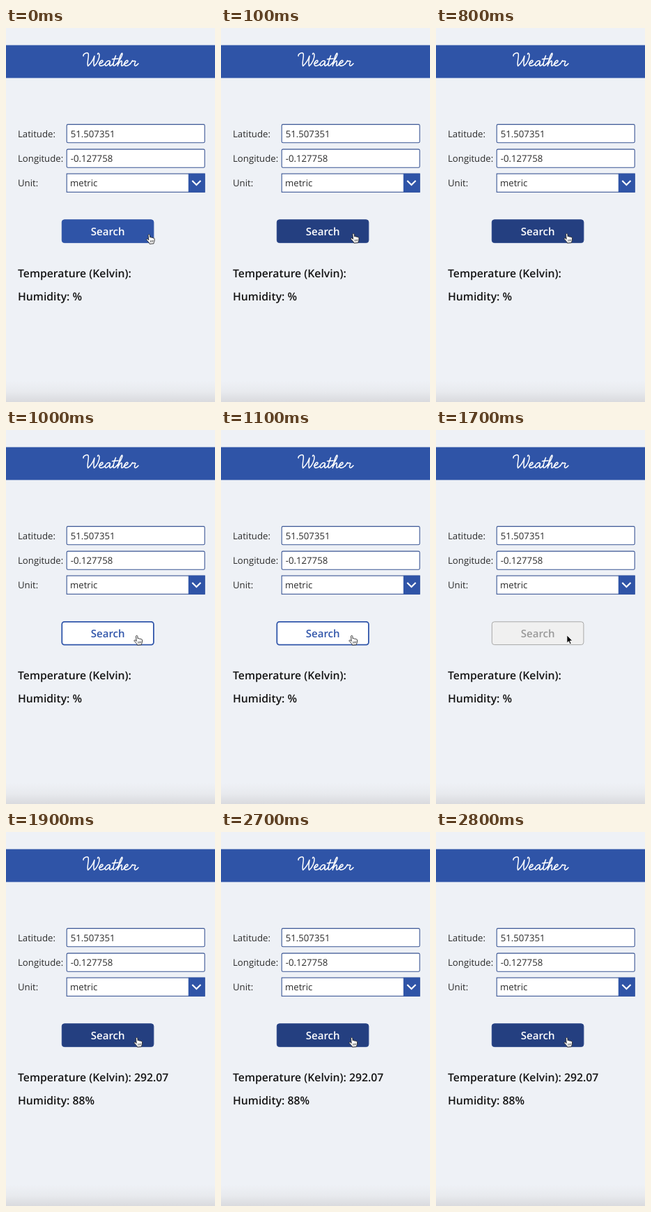
An HTML page that plays this animation: 300 by 534 pixels, repeating every 3.2 s.

```html
<!DOCTYPE html>
<html lang="en">
<head>
<meta charset="utf-8">
<title>Weather</title>
<style>
  html, body { margin: 0; width: 100%; height: 100%; overflow: hidden; background: #eef1f6; }
  svg { display: block; width: 100%; height: 100%; }
  text { font: 13.2px "Open Sans", sans-serif; fill: #2b2b2b; white-space: pre; text-rendering: geometricPrecision; }
  .strong { font-size: 15.75px; font-weight: 600; fill: #151515; }
  .field { fill: #fff; stroke: #3a5594; stroke-width: 1.1; }
  #label { font-size: 15.05px; font-weight: 600; text-anchor: middle; }
  .script { fill: none; stroke: #fff; stroke-width: 1.5; stroke-linecap: round; stroke-linejoin: round; }
  .outline { stroke-width: .9; stroke-linejoin: round; }
</style>
</head>
<body>
<svg viewBox="0 0 300 534">
  <defs>
    <linearGradient id="shade" x2="0" y2="1">
      <stop stop-color="#eef1f6"/>
      <stop offset=".5" stop-color="#e8eaee"/>
      <stop offset="1" stop-color="#d9dade"/>
    </linearGradient>
    <path id="e" d="M133.5 51C137 50.5 139.7 48.5 139 46.8C138 45 134 48 134 51.5C134 55.5 139 54.5 142.5 51"/>
  </defs>

  <rect width="300" height="534" fill="#eef1f6"/>
  <rect y="504" width="300" height="30" fill="url(#shade)"/>
  <rect y="24.5" width="300" height="46.9" fill="#2f54a7"/>

  <g class="script" role="img" aria-label="Weather">
    <path d="M111 40C110.5 37 116.5 34 118.1 36.6C119.5 40 115.8 50 117.6 54.3C121 52 125.5 45 127 40C126.3 45 125 51 126.5 54.3C131 51 134.5 43 134 38C133.6 35.4 131.3 35.6 131.6 37.6"/>
    <use href="#e"/>
    <path d="M149.5 47.5C146.5 45.2 142.2 49.5 142.2 52.5C142.3 55.5 147 53.5 149.5 48C148.5 52 148.3 54.3 150 54C151.5 53.5 153 52 154 50.5"/>
    <path d="M157.5 39.5C155.5 45 153.5 50 154 53C154.5 55 157 53.5 159 51M152.5 44.5L161 43.8"/>
    <path d="M159 51C163 47 167.5 39 167 36.5C166 34 162.5 42 160.2 54.3C161.5 50 164.5 46.5 166 47C167.5 48 164.5 53 166 54C167.5 54.3 169 52.5 170 51"/>
    <use href="#e" x="36"/>
    <path d="M178 51.5C180 49.5 181.5 46 181.8 46.5C181 48.5 185.5 46.5 186 47.5C184.5 50.5 183.5 54 186 54C187.5 53.8 189 52 190 50.8"/>
  </g>

  <text x="17" y="155.5">Latitude:</text>
  <text x="17" y="191">Longitude:</text>
  <text x="17" y="226">Unit:</text>
  <rect class="field" x="87.2" y="137.6" width="198" height="26.2" rx="1.8"/>
  <rect class="field" x="87.2" y="173.1" width="198" height="26.2" rx="1.8"/>
  <rect class="field" x="87.2" y="208.1" width="198" height="26.2"/>
  <rect x="261.8" y="207.8" width="23.8" height="26.8" fill="#2f54a7"/>
  <path d="M267.3 218L273.4 224L279.5 218" fill="none" stroke="#fff" stroke-width="2.1"/>
  <text x="92.7" y="156">51.507351</text>
  <text x="92.7" y="191.3">-0.127758</text>
  <text x="92" y="226">metric</text>

  <rect id="button" x="80.3" y="273.8" width="131.6" height="32.8" rx="3.5"/>
  <text id="label" x="146.2" y="296">Search</text>
  <text id="temperature" class="strong" x="17" y="356"></text>
  <text id="humidity" class="strong" x="17" y="389"></text>

  <g id="hand" class="outline" fill="#fff" stroke="#222">
    <path d="M-1.3 .9C-1.3 -.4 .9 -.4 1 .9L1.4 4.3C2 3.4 3.5 3.8 3.7 4.8C4.4 4 5.7 4.4 5.9 5.4C6.8 4.8 7.8 5.5 7.8 6.5L7.6 9.4C7.5 10.6 6.7 11.2 6.6 13L.7 13.5C.5 11.6 -1.9 9.9 -3.6 7.8C-4.3 6.7 -3 5.9 -2.1 6.6L-.6 7.9Z"/>
    <path d="M1.9 8.4L2.2 11.2M3.8 8.2L4 11M5.6 8L5.6 10.8" fill="none" stroke-width=".7"/>
  </g>
  <path id="arrow" class="outline" fill="#000" stroke="#fff" d="M0 0V11.2L2.6 8.8L4.4 12.8L6.3 11.9L4.5 8.1H8Z"/>
</svg>

<script>
const LOOP = 3200;
const $ = id => document.getElementById(id);

// fill, border, border width, label colour
const looks = {
  idle:     ["#2f54a7", "#2f54a7", 1, "#fff"],
  hover:    ["#243f80", "#2b4789", 1, "#fff"],
  pressed:  ["#fff", "#3156aa", 1.8, "#3156aa"],
  disabled: ["#f0f0f0", "#a8a8a8", 1, "#999"]
};

// start time, button look, pointer shape, pointer x, pointer y, results shown
const steps = [
  [0,    "idle",     "hand",  205.4, 294.8, false],
  [100,  "hover",    "hand",  190.2, 293.6, false],
  [200,  "hover",    "hand",  188.4, 293.6, false],
  [300,  "hover",    "hand",  187.8, 293.6, false],
  [1000, "pressed",  "hand",  187.8, 293.6, false],
  [1200, "disabled", "hand",  187.8, 293.6, false],
  [1300, "disabled", "arrow", 187.9, 293,   false],
  [1800, "hover",    "arrow", 187.9, 293,   true],
  [1900, "hover",    "hand",  187.8, 293.6, true]
];

let shown;

function show([, look, pointer, x, y, results]) {
  const [fill, stroke, width, ink] = looks[look];
  Object.assign($("button").style, { fill, stroke, strokeWidth: width });
  $("label").style.fill = ink;
  for (const id of ["hand", "arrow"]) {
    $(id).setAttribute("transform", `translate(${x} ${y})`);
    $(id).style.display = id === pointer ? "" : "none";
  }
  $("temperature").textContent = "Temperature (Kelvin):" + (results ? " 292.07" : "");
  $("humidity").textContent = `Humidity: ${results ? 88 : ""}%`;
}

const start = performance.now();

function tick() {
  const time = (performance.now() - start) % LOOP;
  const step = steps.findLast(([from]) => from <= time);
  if (step !== shown) show(shown = step);
  requestAnimationFrame(tick);
}
tick();
</script>
</body>
</html>
```
